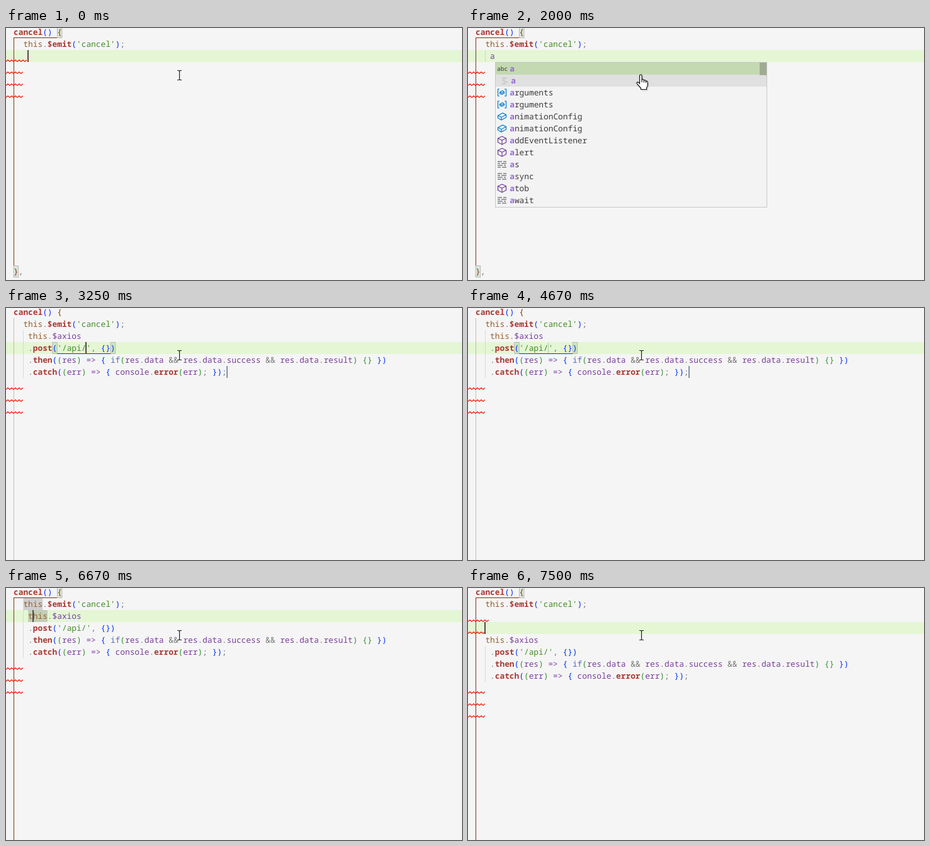
An HTML page for the animation above (8 s loop, 724 by 400 pixels).

```html
<!DOCTYPE html>
<html lang="en">
<head>
<meta charset="utf-8">
<title>Snippet completion in a code editor</title>
<style>
html, body { margin: 0; width: 100%; height: 100%; overflow: hidden; background: #f5f5f5; }
svg { display: block; width: 724px; height: 400px; }
text {
  font: 12.828px "Noto Sans Mono", "DejaVu Sans Mono", monospace;
  white-space: pre;
  text-rendering: geometricPrecision;
}
.p { fill: #777; }
.f { fill: #aa3731; font-weight: 700; }
.t { fill: #9c5d27; }
.v { fill: #7a3e9d; }
.s { fill: #448c27; }
.k { fill: #4b69c6; }
.b { fill: #0431fa; }
.g { fill: #319331; }
.n { fill: #7b3814; }
.l { fill: #3b3b3b; }
.m { fill: #9769dc; font-weight: 700; }
.d { fill: #333; }
.q { fill: #8a9a7c; }
.abc { font-size: 9.5px; }
.hint { font-size: 10.95px; text-anchor: end; }
</style>
</head>
<body>
<svg id="stage" viewBox="0 0 724 400"></svg>
<script>
const LOOP = 8000, CHAR = 7.697, ROW = 19;
const BG = '#f5f5f5', WIDGET = '#f3f3f3', BORDER = '#c8c8c8', SLIDER = '#646464';
const BROWN = '#7b3814', BLUE = '#0431fa';
const stage = document.getElementById('stage');
const colX = c => 12 + c * CHAR;
const rowY = r => r * ROW - 3;
const between = (t, a, b) => t >= a && t < b;
const esc = s => s.replace(/&/g, '&amp;').replace(/</g, '&lt;').replace(/>/g, '&gt;');

const rect = (x, y, w, h, fill, extra = '') =>
  `<rect x="${x}" y="${y}" width="${w}" height="${h}" fill="${fill}" ${extra}/>`;
const path = (d, stroke, extra = '') =>
  `<path d="${d}" fill="none" stroke="${stroke}" ${extra}/>`;

// Each part starts with its style letter; parts are split by "|".
const text = (x, y, parts, name = '') => `<text x="${x}" y="${y}" class="${name}">` +
  parts.split('|').map(p => `<tspan class="${p[0]}">${esc(p.slice(1))}</tspan>`).join('') + '</text>';
const code = (row, col, parts) => text(colX(col), rowY(row) + 14, parts);

const CALL = 'tthis|p.|v$axios';
const CHAIN = [
  "p.|fpost|b(|s'/api/'|p, |b{})",
  'p.|fthen|b(|g(|vres|g)|v => |b{ |kif|g(|vres|p.|vdata|p && |vres|p.|vdata|p.|vsuccess|p && |vres|p.|vdata|p.|vresult|g)|p |g{}|b })',
  'p.|fcatch|b(|g(|verr|g)|v => |b{ |vconsole|p.|ferror|g(|verr|g)|p;|b })|p;'
];

function block(row, col) {
  const guideRow = col === 2 ? row + 1 : row;
  return path(`M27.5 ${rowY(guideRow)}V${rowY(row + 4)}`, '#d8d8d8') +
    code(row, col, CALL) + CHAIN.map((s, i) => code(row + 1 + i, 3, s)).join('');
}

function squiggle(row, end) {
  const y = rowY(row);
  let d = `M0 ${y + 18.2}`;
  for (let x = 3; x <= end; x += 3) d += `L${x} ${y + (x % 6 ? 15.8 : 18.2)}`;
  return path(d, '#e51400', 'stroke-width="1.1"');
}

const matchBox = (row, col) =>
  rect(colX(col) + .2, rowY(row) + .5, 7.4, 18, 'rgba(0,100,0,.1)', 'stroke="#b9b9b9"');
const caret = (row, col) =>
  rect(Math.round(colX(col)) - 1, rowY(row), 2, ROW, '#54494b');

// Completion icons, centred on 0,0.
const CUBE = 'M0 -6.5L6.5 -3.5V3L0 6.5L-6.5 3V-3.5ZM-6.5 -3.5L0 -.3L6.5 -3.5M0 -.3V6.5';
const FLAT_CUBE = 'M-6.5 -1.5L1 -5.5L6.5 -2.8V1.5L-1 5.5L-6.5 2.5ZM-6.5 -1.5L-1 1.2L6.5 -2.8M-1 1.2V5.5';
const BRACKETED = 'M-4 -5.5H-6.5V5.5H-4M4 -5.5H6.5V5.5H4M-3.5 -.5L.5 -3L3.5 -1V1L-.5 3L-3.5 1.5ZM-3.5 -.5L-.5 .8L3.5 -1';
const ICONS = {
  abc: text(-8, 3, 'dabc', 'abc'),
  mini: path('M0 -4H8M0 -1H5M2 2H9M0 5H6', '#b4b4b4'),
  variable: path(BRACKETED, '#007acc', 'stroke-width="1.2"'),
  field: path(FLAT_CUBE, '#007acc', 'stroke-width="1.2"'),
  method: path(CUBE, '#652d90', 'stroke-width="1.1"'),
  keyword: path('M-7 -4.5H0M2 -4.5H7M-7 -1.5H-3M-1 -1.5H7M-7 1.5H1M3 1.5H6M-7 4.5H-2M0 4.5H7', '#424242', 'stroke-width="1.1"'),
  snippet: path('M-6 6V-6H6V6', '#424242') + path('M-6 6H6', '#424242', 'stroke-dasharray="2 1.5"')
};

const LIST_A = [
  ['abc', 'ma'], ['mini', 'ma'],
  ['variable', 'ma|lrguments'], ['variable', 'ma|lrguments'],
  ['field', 'ma|lnimationConfig'], ['field', 'ma|lnimationConfig'],
  ['method', 'ma|lddEventListener'], ['method', 'ma|llert'],
  ['keyword', 'ma|ls'], ['keyword', 'ma|lsync'],
  ['method', 'ma|ltob'], ['keyword', 'ma|lwait']
];
const AUDIO = 'mA|lud|mi|loConte|mx|lt';
const LIST_AXI = [
  ['snippet', 'l$|maxi|los'], ['variable', 'mA|lct|mi|lve|mX|lObject'],
  ['field', 'ma|llarmE|mx|lp|mi|lreDayVue'],
  ['variable', AUDIO], ['variable', AUDIO],
  ['variable', 'lBase|' + AUDIO], ['variable', 'lBase|' + AUDIO],
  ['variable', 'lOffline|' + AUDIO], ['variable', 'lOffline|' + AUDIO]
];

function popup(x, list) {
  let s = rect(x + .5, 54.5, 431, list.length * ROW + 2, WIDGET, `stroke="${BORDER}"`);
  s += rect(x + 1, 55, 430, ROW, '#c4d9b1') + rect(x + 1, 74, 430, ROW, '#e0e0e0');
  list.forEach(([icon, label], i) => {
    const y = 64.5 + i * ROW;
    s += `<g transform="translate(${x + 11} ${y})">${ICONS[icon]}</g>`;
    s += text(x + (icon === 'mini' ? 25.2 : 23.2), y + 4.5, label);
  });
  return s;
}

function details(sliderAlpha) {
  const lines = [
    [72, 'pLog output to console (Global Snip'], [91, 'ppet)'],
    [127, 'dthis.$axios'], [146, "d.post('/api/', {})"],
    [165, 'd.then((res) => { if(res.data && res'],
    [184, 'd.catch((err) => { console.error(err)']
  ];
  return rect(489.5, 54.5, 250, 138.5, WIDGET, `stroke="${BORDER}"`) +
    lines.map(([y, s]) => text(495.3, y, s)).join('') +
    rect(490, 183, 183, 10, SLIDER, `opacity="${sliderAlpha}"`);
}

const BEAM = 'M272 67.5H274.5L275.5 68.5L276.5 67.5H279M275.5 68V82M272 82.5H274.5L275.5 81.5L276.5 82.5H279';
const HAND = 'M272.5 76Q272.5 74 274.3 74Q276 74 276 76V82Q278.5 80.5 279.3 83Q281.8 82 282.4 84.3Q285.2 83.6 285.2 86.5V90Q285.2 93 283.5 95V97.5H274.5V95.5L270 90.5Q267.3 87.6 268.2 86.4Q269.6 85 272.5 88Z';
const beam = path(BEAM, '#222', 'stroke-width="1.2"');
const hand = path(HAND, '#666', 'opacity=".35" transform="translate(1.5 1.5)"') +
  `<path d="${HAND}M276 82V86M279.3 83V86.5M282.4 84.3V87" fill="#fff" stroke="#111" stroke-width="1.2"/>`;

// Times at which the caret moves one column left along the call.
const STEPS = [4830, 5170, 5330, 5420, 5580, 5670, 5920, 6000, 6170, 6250, 6420, 6920];

function scene(t) {
  const inserted = t >= 3170, tabstop = between(t, 3170, 4830);
  const newLines = t < 7170 ? 0 : t < 7330 ? 1 : 2;
  const typed = t < 1500 ? '' : t < 2420 ? 'a' : t < 2500 ? 'ax' : 'axi';
  const active = tabstop || between(t, 7170, 7330) || t >= 7500 ? 3 : t >= 7330 ? 4 : 2;
  let s = rect(0, 0, 724, 400, BG) + rect(0, rowY(active), 724, ROW, '#e4f6d4');

  // Other uses of the word under the caret
  if (between(t, 6670, 7170))
    for (const [row, col] of [[1, 2], [2, 3]])
      s += rect(colX(col), rowY(row), 4 * CHAR, ROW, 'rgba(87,87,87,.25)');

  // Scope guide and matching brackets
  s += path(`M12.5 ${tabstop ? 16 : 15}V${inserted ? 400 : 377}`, BROWN, `opacity="${tabstop ? .3 : 1}"`);
  if (tabstop) {
    s += matchBox(3, 8) + matchBox(3, 20) + path(`M${colX(9)} 72.5H${colX(20)}`, BLUE);
    s += rect(127, 55, 1.2, 17, 'rgba(10,50,100,.2)') + rect(350, rowY(5), 2, ROW, 'rgba(10,50,100,.5)');
  } else {
    s += path('M12 15.5H81', BROWN) + matchBox(0, 9);
  }
  if (!inserted) s += matchBox(20, 0) + code(20, 0, 'n}|p,');

  s += code(0, 0, 'fcancel|b()|p |n{') + code(1, 2, "tthis|p.|f$emit|b(|s'cancel'|b)|p;");
  if (inserted) s += block(2 + newLines, newLines ? 2 : 3);
  else if (typed) s += path('M27.5 35V54', '#ccd9c0') + code(2, 3, 'v' + typed);

  // Lint marks
  if (t < 1580 || newLines === 2) s += squiggle(2, 35);
  if (newLines === 2) s += squiggle(3, 27);
  const first = inserted ? 6 + newLines : 3;
  for (let i = 0; i < 3; i++) s += squiggle(first + i, 27);

  // Caret
  if (!inserted) {
    const off = between(t, 170, 670) || between(t, 1170, 1500) || between(t, 2000, 2420);
    if (!off) s += caret(2, 3 + typed.length);
  } else if (tabstop) {
    if (t < 3750 || between(t, 4250, 4670)) s += caret(3, 15);
  } else if (newLines) {
    s += caret(active, 2);
  } else {
    s += caret(2, 15 - STEPS.filter(x => t >= x).length);
  }

  if (between(t, 1830, 2580))
    s += popup(43, LIST_A) + rect(463, 55, 11, 20, SLIDER, 'opacity=".4"');
  if (between(t, 2580, 3170)) {
    s += popup(58, LIST_AXI) + text(479.5, 68, 'qPrint to console', 'hint');
    if (t >= 2670) s += details(t < 2750 ? .2 : .4);
  }
  return s + (between(t, 1920, 3250) ? hand : beam);
}

let last = '';
const start = performance.now();
function tick() {
  const s = scene((performance.now() - start) % LOOP);
  if (s !== last) stage.innerHTML = last = s;
  requestAnimationFrame(tick);
}
tick();
</script>
</body>
</html>
```
